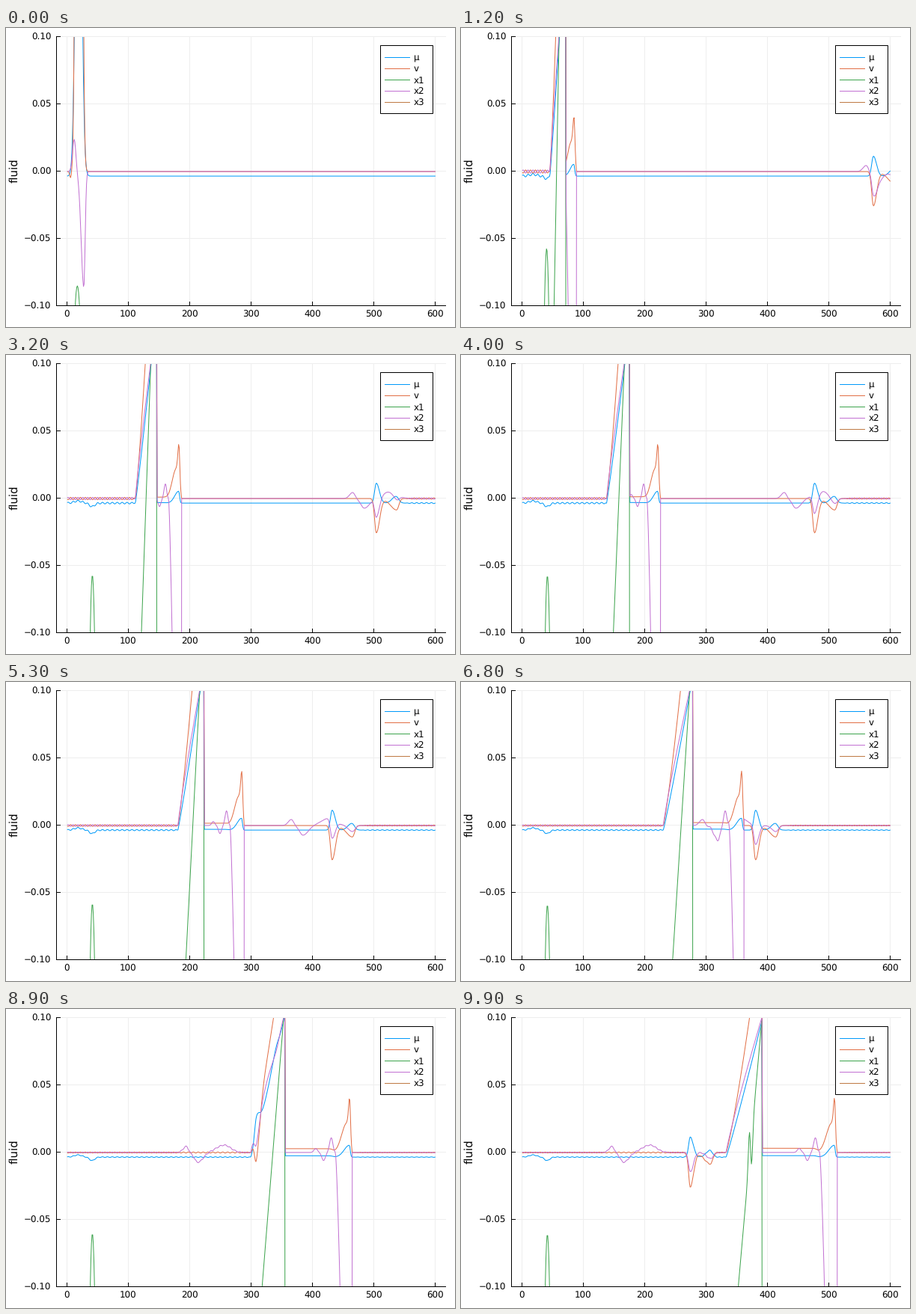
A matplotlib script for the animation above (10 s loop, 600 px wide and 400 px high).

```python
import numpy as np
import matplotlib.pyplot as plt
from matplotlib.animation import FuncAnimation
from matplotlib.patches import Rectangle

plt.rcParams["font.family"] = "DejaVu Sans"
plt.rcParams["text.hinting"] = "none"
FRAMES, STEP = 100, 100
PX = 0.72  # one pixel in points at 100 dpi
BLUE, ORANGE, GREEN, PURPLE, BROWN = "#009af9", "#e26f46", "#3da44d", "#c271d2", "#bf7a45"
BASE = -0.0034

x = np.arange(1, 601, dtype=float)


def hump(d, left, right=None):
    """Bell of height 1 at d = 0 with its own width on each side."""
    return np.exp(-(d / np.where(d < 0, left, right or left)) ** 2)


def ramp(foot, width, power):
    return .1 * np.clip((x - foot) / width, 0, None) ** power


def start_pulse(foot, front):
    """The first disturbance, stretched between its two edges."""
    t = 6 + (x - foot) * 28 / (front + 4 - foot)
    blue = BASE + .36 * hump(t - 19, 6.3)
    orange = 1.7 * hump(t - 19.6, 4.74) - .005 * hump(t - 6, 2)
    purple = .024 * hump(t - 12, 4, 3.5) - .086 * hump(t - 27.5, 6, 3)
    return np.array([blue, orange, purple])


def left_wave(c, e):
    """Two wave groups that enter from the right edge and travel left."""
    blue = .0148 * hump(c, 4, 7) + .005 * hump(c - 32, 9, 6)
    orange = -.0255 * hump(c, 4, 7.5) - .0085 * hump(c - 33, 14, 5)
    purple = -.0145 * hump(c, 4, 7) - .0045 * hump(c - 33, 9, 6)
    purple += .0045 * hump(e, 7, 5) - .0072 * hump(e - 19, 8, 12) + .0055 * hump(e - 62, 18, 15)
    return np.array([blue, orange, purple])


def front_pulse(k, r):
    """Fast pulse running ahead of the shock; r is the distance from its front."""
    z = 17 + .11 * k
    inside = r < 0
    level = 3.2e-5 * k / (1 + np.exp((r + 1.15 * z) / 2))
    blue = .0088 * hump(r + 4, .45 * z, 2) * min(k / 10, 1) + .35 * level
    orange = .022 * hump(r + 8, .45 * z, 5) + .03 * hump(r + 3.5, 2.5, 2)
    orange = orange * min(k / 10, 1) + level
    purple = (.011 * hump(r + 1.25 * z, .15 * z, .13 * z) - .006 * hump(r + 1.72 * z, .15 * z)
              + .003 * hump(r + 2.2 * z, .15 * z))
    purple -= .1 * (np.clip(r + z, 0, None) / (.28 * z)) ** 1.4
    return np.array([blue, orange, purple]) * inside


def green_line(k, foot, shock, early):
    lo, hi = foot + 5 + .15 * k, foot + 9 + .5 * k
    rise = -.1 + .2 * (x - lo) / (hi - lo) - 1.5 * early
    d = (x - 372.5) / 3
    rise -= .05 * np.clip((k - 90) / 6, 0, 1) * d * np.exp(-d * d)
    rise = np.where(x < shock, rise, -1)
    settle = np.exp(-k / 4)
    peak = -.055 - .00006 * k - .03 * settle
    spike = peak - (peak + .1) * ((x - 41.5 + 24.5 * settle) / 3.5) ** 2
    return np.maximum(rise, spike)


def profiles(k):
    foot = 6 + 3.3 * k
    shock = 26.3 + 3.77 * k - .0008 * k * k
    c = x - (614 - 3.43 * k)
    e = x - (618 - 4.76 * k)
    r = x - (30 + 4.88 * k)

    ys = left_wave(c, e)
    ys[0] += BASE
    climb = np.array([ramp(foot, 9.2 + .49 * k, 1.07),
                      ramp(foot, 5.5 + .33 * k, 1.2),
                      ramp(foot, 8.6 + .5 * k, .9)])
    ys += np.where(x < shock, climb, front_pulse(k, r))

    # small ripples left behind the waves
    calm = np.clip((foot - x) / 4, 0, 1)
    wake = np.clip(np.minimum(c - 45, r) / 15, 0, 1)
    ripple = .0014 * np.exp(-k / 70) * (calm + .6 * wake) * np.sin(2 * np.pi * x / 8)
    ys += ripple * np.array([[.7], [-1], [1]])
    ys[0] += min(k / 15, 1) * calm * (.0016 * hump(x - 18, 9) - .0026 * hump(x - 41, 6))

    early = max(0, 1 - k / 6)
    ys = early * start_pulse(foot, 30 + 4.88 * k) + (1 - early) * ys
    return ys[0], ys[1], green_line(k, foot, shock, early), ys[2]


fig = plt.figure(figsize=(6, 4), dpi=100, facecolor="white")


def pixel_layer(z):
    layer = fig.add_axes([0, 0, 1, 1], zorder=z)
    layer.set_xlim(0, 600)
    layer.set_ylim(400, 0)
    layer.axis("off")
    return layer


# plot area in pixels: 67.5..588 across, 12..372 down
ax = fig.add_axes([67.5 / 600, 28 / 400, 520.5 / 600, 360 / 400])
ax.set_xlim((67.5 - 81.4) / .82, (588 - 81.4) / .82)
ax.set_ylim(-.1, .1)
ax.axis("off")
grid, page = pixel_layer(-1), pixel_layer(2)


def stroke(xs, ys, color="black", on=page):
    on.plot(xs, ys, color=color, lw=PX, solid_capstyle="butt", snap=False)


def label(px, py, text, size=8.6, **kw):
    page.text(px, py, text, fontsize=size, color="black", **kw)


stroke([67.5, 67.5], [12, 372])
stroke([67, 588], [371.5, 371.5])
for n in range(7):
    px = 81.5 + 82 * n
    stroke([px, px], [12, 372], "#eeeeee", grid)
    stroke([px, px], [366, 372])
    label(px, 387, str(100 * n), ha="center", va="baseline")
for n in range(5):
    py = 11.5 + 90 * n
    stroke([67, 588], [py, py], "#eeeeee", grid)
    stroke([67, 73], [py, py])
    text = f"{.1 - .05 * n:.2f}".replace("-", "\u2212")
    label(60.5, py + 4.5, text, ha="right", va="baseline")
label(11.3, 190.5, "fluid", 10.8, rotation=90, ha="center", va="center")

page.add_patch(Rectangle((500.5, 23.5), 70, 91, fc="white", ec="black", lw=PX,
                         zorder=1, snap=False))
names = ("\u03bc", "v", "x1", "x2", "x3")
for n, (name, color) in enumerate(zip(names, (BLUE, ORANGE, GREEN, PURPLE, BROWN))):
    py = 39.5 + 15 * n
    stroke([506, 540], [py, py], color)
    label(545, py + 4, name, va="baseline")

lines = [ax.plot([], [], color=c, lw=PX)[0] for c in (BLUE, ORANGE, GREEN, PURPLE)]


def draw(k):
    for line, y in zip(lines, profiles(k)):
        line.set_data(x, np.clip(y, -.6, .6))
    return lines


anim = FuncAnimation(fig, draw, frames=FRAMES, interval=STEP, repeat=True, repeat_delay=0)
plt.show()
```
